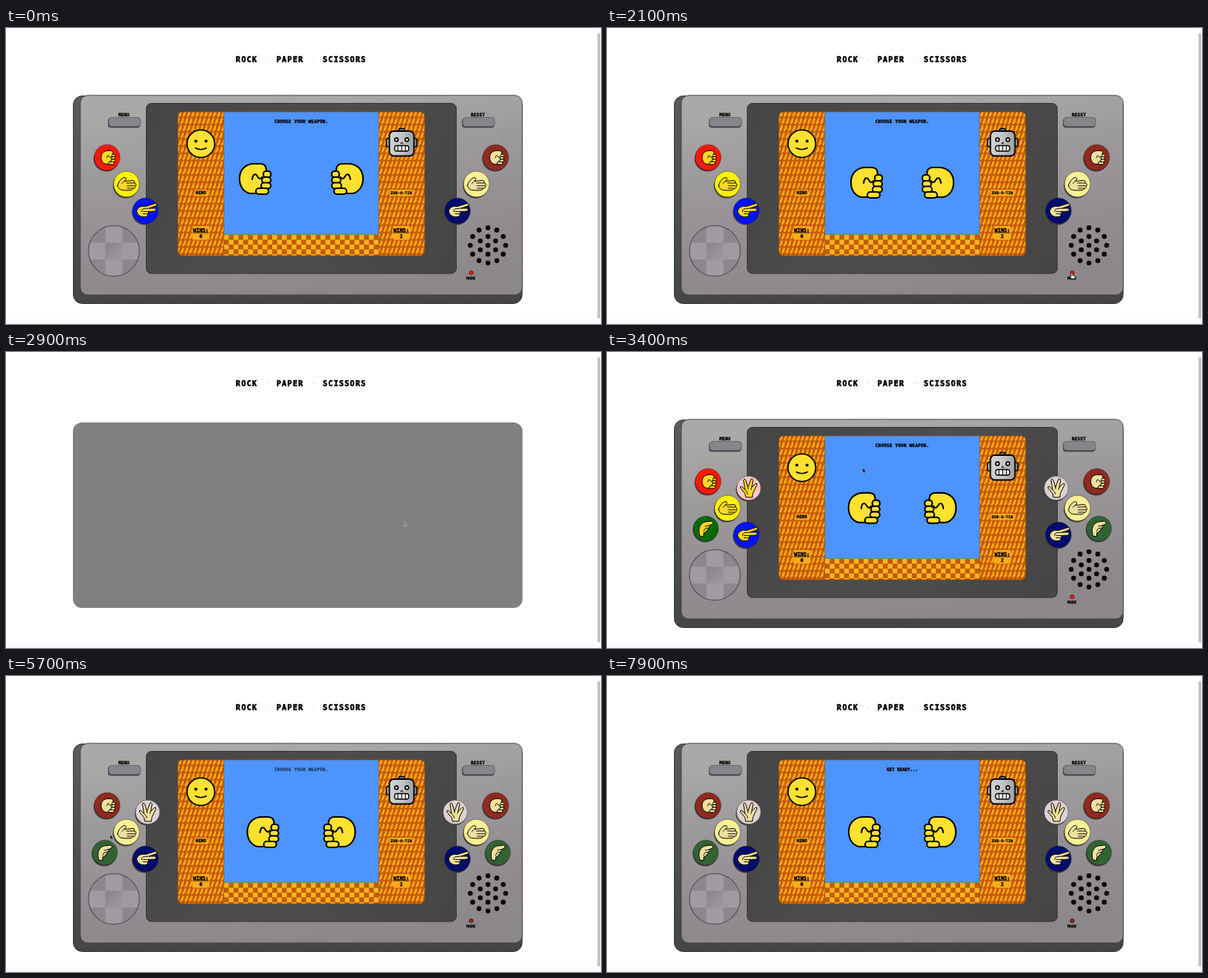
An HTML page with a canvas for the animation above (8000 ms loop, 800 by 399 pixels).

```html
<!DOCTYPE html>
<html lang="en">
<head>
<meta charset="utf-8">
<title>Rock Paper Scissors</title>
<style>
html, body { margin: 0; width: 100%; height: 100%; overflow: hidden; background: #fff; }
canvas { display: block; }
</style>
</head>
<body>
<canvas id="stage" width="800" height="399"></canvas>
<script>
const LOOP = 8000;
const LOADING = [2600, 3300];
const stage = document.getElementById('stage');
const shell = document.createElement('canvas');
shell.width = 800;
shell.height = 399;
let ctx = shell.getContext('2d');

const clamp = v => Math.max(0, Math.min(1, v));
const ramp = (t, a, b) => clamp((t - a) / (b - a));
const mix = (a, b, k) => `rgb(${a.map((v, i) => Math.round(v + (b[i] - v) * k))})`;
const isLoading = t => t >= LOADING[0] && t < LOADING[1];

// Eased position along [time, x, y] points
function track(t, keys) {
  if (t <= keys[0][0]) return keys[0].slice(1);
  for (let i = 1; i < keys.length; i++) {
    const [t1, x1, y1] = keys[i];
    if (t > t1) continue;
    const [t0, x0, y0] = keys[i - 1];
    const k = (1 - Math.cos(Math.PI * ramp(t, t0, t1))) / 2;
    return [x0 + (x1 - x0) * k, y0 + (y1 - y0) * k];
  }
  return keys[keys.length - 1].slice(1);
}

function paint(path, fill, stroke, width = 1) {
  if (fill) { ctx.fillStyle = fill; ctx.fill(path); }
  if (stroke) { ctx.strokeStyle = stroke; ctx.lineWidth = width; ctx.stroke(path); }
}

function box(x, y, w, h, r, fill, stroke, width) {
  const path = new Path2D();
  path.roundRect(x, y, w, h, r);
  paint(path, fill, stroke, width);
}

function disc(x, y, r, fill, stroke, width) {
  const path = new Path2D();
  path.arc(x, y, r, 0, Math.PI * 2);
  paint(path, fill, stroke, width);
}

function gradient(x0, y0, x1, y1, colors) {
  const g = ctx.createLinearGradient(x0, y0, x1, y1);
  colors.forEach((c, i) => g.addColorStop(i / (colors.length - 1), c));
  return g;
}

function label(str, x, y, size = 6, spacing = 0.2) {
  ctx.font = `bold ${size}px "DejaVu Sans Mono", monospace`;
  ctx.letterSpacing = spacing + 'px';
  ctx.textAlign = 'center';
  ctx.textBaseline = 'alphabetic';
  ctx.fillStyle = ctx.strokeStyle = '#000';
  ctx.lineWidth = size * 0.06;
  ctx.fillText(str, x, y + size * 0.365);
  ctx.strokeText(str, x, y + size * 0.365);
}

function at(x, y, sx, sy, draw) {
  ctx.save();
  ctx.translate(x, y);
  ctx.scale(sx, sy);
  ctx.lineJoin = ctx.lineCap = 'round';
  draw();
  ctx.restore();
}

const FIST = new Path2D('M22 41H15C6 39 1 31 1 21C1 9 9 1 21 1H29C34 1 37 4 37 10V20L34 41Z');
const FIST_FOLD = new Path2D('M18 22C19 15 22 13 25 18C27 22 30 22 31 19');

function fist(color, width) {
  paint(FIST, color, '#000', width);
  box(33, 11, 10, 8.5, 3.5, color, '#000', width);
  box(31, 19, 12, 8, 4, color, '#000', width);
  box(30, 26.5, 13, 8, 4, color, '#000', width);
  box(23, 34, 17, 8, 4, color, '#000', width);
  paint(FIST_FOLD, null, '#000', width);
}

const PAPER = [
  new Path2D('M-12 2C-11 -3 -7 -8 -3 -9C0 -9 0 -6 -3 -4L9 -5Q12 -4 10 -2L12 -1Q14 1 12 2.5L12 4Q11 6 9 6L7 8Q0 9 -6 8Q-11 7 -12 2Z'),
  new Path2D('M-3 -4L-6 -1M0 -1.5H10M1 2.2H11M1 5.5H9'),
];
const SCISSORS = [
  new Path2D('M-12 1C-11 -5 -6 -7 0 -6L13 -10Q16 -10 15 -7L5 -3.5L13 -3.5Q16 -1.5 13 0.5L3 1Q6 3 3 4Q4 8 -1 8Q-9 9 -12 1Z'),
  new Path2D('M3 1L-3 1M3 4L-3 4M5 -3.5L0 -3Q-6 -3 -5 1'),
];
const SPOCK = [
  new Path2D('M-4 12L-5 7L-11 0Q-12 -3 -9 -2L-5 2L-7 -11Q-6 -14 -4 -11L-1 -1L3 -12Q5 -14 6 -11L4 -1L9 -6Q12 -7 11 -4L6 6Q5 9 5 12Z'),
  new Path2D('M-1 -1V1M4 -1L3 2M-5 2Q-2 4 -1 8'),
];
const LIZARD = [
  new Path2D('M-8 10C-11 2 -9 -7 -1 -9L7 -10Q11 -9 9 -6L4 -4Q7 -3 4 -1Q3 1 1 3Q0 6 -3 6V10Z'),
  new Path2D('M4 -4L-1 -3M4 -1L-1 0Q-3 2 -3 4'),
];

function hand([shape, folds], color) {
  paint(shape, color, '#000', 1);
  paint(folds, null, '#000', 0.9);
}

const SKIN = [[255, 216, 38], [239, 224, 157]];
const BUTTONS = [
  { x: 136, y: 174.5, r: 17.3, on: [255, 25, 0], off: [143, 42, 30] },
  { x: 162, y: 210.5, r: 17.3, on: [255, 242, 0], off: [248, 240, 148], icon: PAPER },
  { x: 187.5, y: 246.5, r: 17.3, on: [0, 18, 250], off: [0, 12, 108], icon: SCISSORS },
  { x: 190.5, y: 183.5, r: 16.3, on: [255, 199, 199], off: [222, 209, 212], icon: SPOCK, extra: true },
  { x: 133, y: 238, r: 16.8, on: [0, 108, 0], off: [50, 99, 52], icon: LIZARD, extra: true },
];

function button({ x, y, r, on, off, icon }, mirrored, dim) {
  const cx = mirrored ? 794.5 - x : x;
  const skin = mix(...SKIN, dim);
  disc(cx - 1, y + 1.8, r, '#423d40');
  disc(cx, y, r, mix(on, off, dim), 'rgba(40,30,30,.55)', 0.8);
  if (icon) at(cx, y, 1, 1, () => hand(icon, skin));
  else at(cx - 8.5, y - 9.5, 0.45, 0.45, () => fist(skin, 2.2));
}

function sidePanel(x, w) {
  ctx.save();
  ctx.beginPath();
  ctx.rect(x, 113, w, 194);
  ctx.clip();
  ctx.fillStyle = '#c45a05';
  ctx.fillRect(x, 113, w, 194);
  ctx.fillStyle = '#ffab18';
  for (let row = 0; row < 21; row++) {
    for (let col = -1; col < 13; col++) {
      const px = x + col * 5.8 + (row % 2) * 2.9, py = 111 + row * 9.7;
      ctx.beginPath();
      [[3.6, 0.4], [5.6, 1.4], [4.4, 4.8], [5.2, 5.2], [2, 9], [0.4, 8], [1.6, 5]]
        .forEach(([dx, dy]) => ctx.lineTo(px + dx, py + dy));
      ctx.fill();
    }
  }
  ctx.restore();
}

function floor() {
  const cell = 6.5;
  ctx.save();
  ctx.beginPath();
  ctx.rect(293, 279, 208, 28);
  ctx.clip();
  for (let r = 0; r < 5; r++) {
    for (let c = 0; c < 32; c++) {
      ctx.fillStyle = (r + c) % 2 ? '#c45a05' : '#ffb41e';
      ctx.fillRect(293 + c * cell, 279 + r * cell, cell + 0.3, cell + 0.3);
    }
  }
  ctx.restore();
}

function hero() {
  disc(262, 156, 18.6, '#ffe12e', '#000', 1.8);
  disc(255.3, 152.5, 2, '#000');
  disc(269, 152.5, 2, '#000');
  paint(new Path2D('M254 161.5Q262 166 270 161.5'), null, '#000', 1.6);
}

function robot() {
  box(528, 135.5, 8, 5, 2, '#777', '#000', 1.6);
  box(511.5, 149, 6, 11, 2, '#aaa', '#000', 1.6);
  box(546.5, 149, 6, 11, 2, '#888', '#000', 1.6);
  box(515.5, 139, 33, 33.5, 6, gradient(515, 0, 549, 0, ['#d0d2d3', '#c3c5c6', '#9b9d9f']), '#000', 1.8);
  for (const x of [525, 539]) disc(x, 150.5, 2.4, '#eee', '#000', 1.6);
  paint(new Path2D('M532 153.5L533.5 156H530.5Z'), '#a33', '#000', 0.5);
  box(522.5, 158.5, 19, 7.5, 3, '#fff', '#000', 1.4);
  paint(new Path2D('M527 158.5V166M532 158.5V166M537 158.5V166'), null, '#000', 1.2);
}

function score(x, name, wins, nameWidth, spacing, size) {
  const tag = '#ffab18';
  box(x - nameWidth / 2, 218, nameWidth, 8.5, 1, tag);
  label(name, x, 222.3, size, spacing);
  box(x - 11.5, 267, 23, 10.5, 1, tag);
  label('WINS:', x, 272, 7, 0);
  ctx.fillRect(x - 10.5, 275.5, 21, 0.9);
  box(x - 11.5, 277, 23, 8.5, 2, tag);
  label(wins, x, 281, 6.5, 0);
}

function pill(x, name, cx) {
  label(name, cx, 117);
  box(x - 1, 121.5, 43.5, 13, 4, '#48454a');
  box(x, 120.5, 43, 12, 4, '#88848b', '#625f65', 0.8);
}

function dpad() {
  ctx.save();
  ctx.beginPath();
  ctx.arc(145, 300.5, 34, 0, Math.PI * 2);
  ctx.clip();
  ctx.fillStyle = '#8c878c';
  ctx.fillRect(110, 266, 70, 70);
  ctx.fillStyle = '#a19aa0';
  ctx.fillRect(133.5, 266, 23, 70);
  ctx.fillRect(110, 289.5, 70, 22.5);
  ctx.fillStyle = gradient(134, 290, 157, 312, ['#888489', '#a19aa0']);
  ctx.fillRect(133.5, 289.5, 23, 22.5);
  ctx.restore();
  disc(145, 300.5, 34.2, null, '#555154', 1.2);
}

function speaker() {
  for (let ring = 0; ring < 3; ring++) {
    const count = ring * 6 || 1;
    const turn = ring === 1 ? Math.PI / 6 : 0;
    for (let i = 0; i < count; i++) {
      const a = i / count * Math.PI * 2 + turn;
      disc(648 + Math.cos(a) * ring * 11.9, 293 + Math.sin(a) * ring * 11.9, 3.3, '#050505');
    }
  }
}

function drawShell() {
  box(90.5, 91.5, 603.5, 280, 12, gradient(0, 91, 0, 372, ['#5b5b5c', '#454546']), '#343435', 1);
  box(100, 90.8, 594, 269, 10,
    gradient(370, 91, 400, 360, ['#a9a9a7', '#9c999b', '#938e92', '#8c878b']), '#4b4a4c', 1);
  box(188.5, 101.5, 417, 229.5, 7, gradient(188, 101, 606, 331, ['#454545', '#4d4d4d', '#454545']), '#383838', 1);

  ctx.save();
  ctx.beginPath();
  ctx.roundRect(231, 113, 332, 194, 6);
  ctx.clip();
  sidePanel(231, 62);
  sidePanel(501, 62);
  ctx.fillStyle = '#4d94ff';
  ctx.fillRect(293, 113, 208, 166);
  floor();
  ctx.fillStyle = '#669b32';
  ctx.fillRect(293, 277.7, 208, 1.3);
  ctx.fillStyle = '#8a5a35';
  ctx.fillRect(292.5, 113, 0.8, 194);
  ctx.fillRect(500.7, 113, 0.8, 194);
  ctx.restore();
  box(231, 113, 332, 194, 6, null, '#8a4a18', 0.8);

  hero();
  robot();
  score(262, 'HERO', '0', 17, 0, 6);
  score(531.5, 'ZUB-O-TIN', '2', 32, 0.2, 5);
  pill(138, 'MENU', 158.5);
  pill(614, 'RESET', 634.5);
  dpad();
  speaker();
  label('MODE', 625, 337, 5, 0);
}

function drawPage() {
  ctx.fillStyle = '#fff';
  ctx.fillRect(0, 0, 800, 399);
  ctx.fillStyle = '#fafafa';
  ctx.fillRect(0, 393, 800, 6);
  ctx.fillRect(794, 0, 6, 399);
  box(795.3, 7, 3.7, 384.5, 2, '#c1c1c1');
  label('ROCK', 323.7, 42, 10, 1.3);
  label('PAPER', 382, 42, 10, 1.3);
  label('SCISSORS', 455.3, 42, 10, 1.3);
  ctx.fillStyle = '#999';
  ctx.fillRect(350.5, 41.5, 1, 1);
  ctx.fillRect(413, 41.5, 1, 1);
}

function fistPosition(t) {
  if (t < LOADING[0]) {
    const c = Math.cos(t / 1400 * Math.PI * 2);
    return [320 - 7 * c, 184.5 - 2.5 * c];
  }
  if (t > 6700) return [324, 185 + 4 * Math.cos((t - 6700) / 400 * Math.PI * 2)];
  return track(t, [
    [3300, 324, 189], [3850, 321, 187], [4300, 324, 189.5], [4900, 325, 188],
    [5700, 323.5, 189], [6200, 313, 182], [6700, 324, 189],
  ]);
}

function drawFists(t) {
  const [x, y] = fistPosition(t);
  at(x, y, 1, 1, () => fist('#ffe12e', 2.1));
  at(794 - x, y, -1, 1, () => fist('#ffe12e', 2.1));
}

function drawMessage(t) {
  const ready = t >= 6400;
  ctx.globalAlpha = ready ? ramp(t, 6400, 6700) : 1 - ramp(t, 5000, 6400);
  label(ready ? 'GET READY...' : 'CHOOSE YOUR WEAPON.', 397, 126, 6, ready ? -0.1 : 0.2);
  ctx.globalAlpha = 1;
}

const ARROW = new Path2D('M0 0V6L1.5 4.8L2.6 7L3.6 6.5L2.6 4.4H4.4Z');
const POINTER = new Path2D('M-1 0Q0 -1.5 1 0V2.5L4 3.5Q5 4 4 7H0L-3 3.5Q-2 2.5 -1 3.5Z');

function drawCursor(t) {
  if (t < 100 || t >= 7700) return;
  const [x, y] = track(t, [
    [100, 657, 284], [900, 624, 300], [1500, 625, 331], [2550, 625, 331],
    [2900, 535, 229], [3600, 300, 140], [3950, 180, 150], [4250, 174, 219],
    [4750, 174, 219], [5400, 140, 214],
  ]);
  const pointing = t > 1300 && t < LOADING[0];
  const fill = isLoading(t) ? '#808080' : '#111';
  at(x, y, 1, 1, () => pointing
    ? paint(POINTER, '#fff', '#000', 0.8)
    : paint(ARROW, fill, 'rgba(255,255,255,.6)', 0.4));
}

function drawFrame(t) {
  drawPage();
  if (isLoading(t)) {
    box(90, 95, 604.5, 250, 12, '#808080');
  } else {
    ctx.drawImage(shell, 0, 0);
    const dim = ramp(t, 4650, 5000);
    for (const b of BUTTONS) {
      if (b.extra && t < LOADING[1]) continue;
      button(b, false, dim);
      button(b, true, 1);
    }
    disc(625.5, 330, 2.8, mix([235, 30, 18], [150, 40, 28], dim), '#4a2020', 0.8);
    drawFists(t);
    drawMessage(t);
  }
  drawCursor(t);
}

drawShell();
ctx = stage.getContext('2d');
const start = performance.now();
function tick() {
  drawFrame((performance.now() - start) % LOOP);
  requestAnimationFrame(tick);
}
tick();
</script>
</body>
</html>
```
